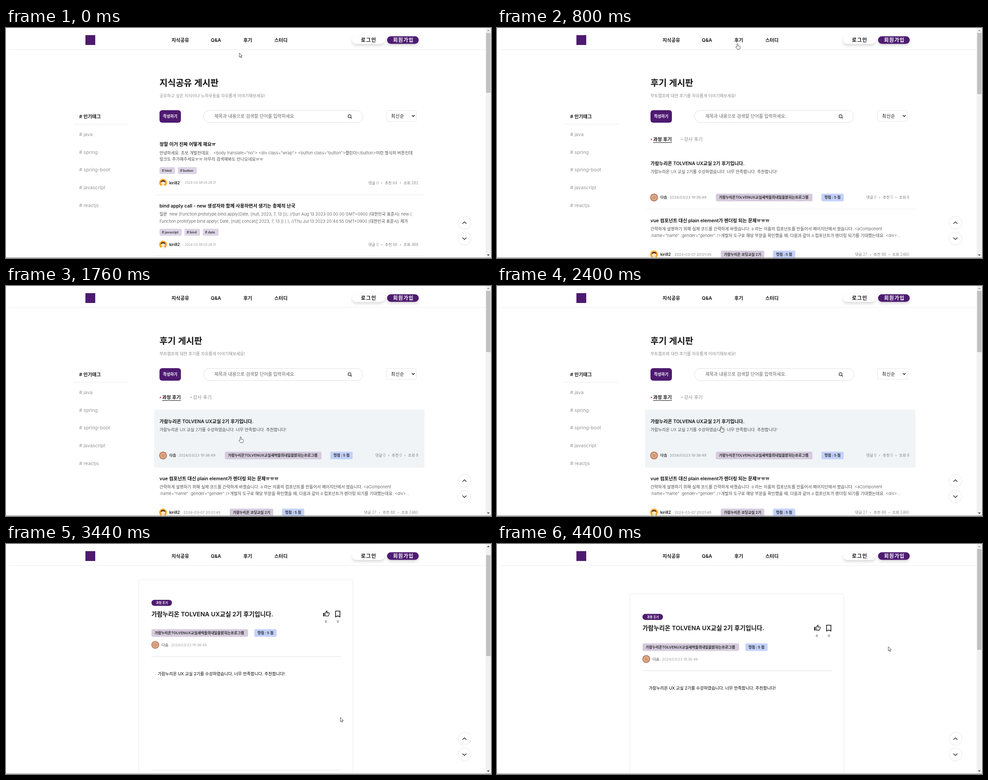
Write an HTML page that moves like this. It is 1087 px wide and 515 px high and loops after 4.48 s.

```html
<!DOCTYPE html>
<html lang="ko">
<head>
<meta charset="utf-8">
<title>Board</title>
<style>
html, body { margin: 0; width: 100%; height: 100%; overflow: hidden; background: #fff; }
svg { display: block; width: 1087px; height: 515px; }
text { font-family: Inter, "Noto Sans CJK KR", "Noto Sans CJK", sans-serif; white-space: pre; }
</style>
</head>
<body>
<svg id="stage" viewBox="0 0 1087 515" xmlns="http://www.w3.org/2000/svg"></svg>
<script>
const PURPLE = '#4e1a70', INK = '#141414', GRAY = '#8c8c8c';
const LOOP = 4480, STEP = 80;
const TO_REVIEW = 720, TO_DETAIL = 2640;

const esc = s => s.replace(/&/g, '&amp;').replace(/</g, '&lt;');
const text = (x, y, size, s, weight = 400, fill = INK, extra = '') =>
  `<text x="${x}" y="${y}" font-size="${size}" font-weight="${weight}" fill="${fill}" ${extra}>${esc(s)}</text>`;
const box = (x, y, w, h, r, fill, extra = '') =>
  `<rect x="${x}" y="${y}" width="${w}" height="${h}" rx="${r}" fill="${fill}" ${extra}/>`;
const frame = (x, y, w, h, r, color) => box(x, y, w, h, r, '#fff', `stroke="${color}"`);
const circle = (x, y, r, fill, extra = '') => `<circle cx="${x}" cy="${y}" r="${r}" fill="${fill}" ${extra}/>`;
const path = (d, extra) => `<path d="${d}" ${extra}/>`;
const stroke = (d, width, color = INK) => path(d, `fill="none" stroke="${color}" stroke-width="${width}"`);
const rule = (x1, x2, y, color = '#ececec') => stroke(`M${x1} ${y}H${x2}`, 1, color);

const title = '가람누리온 TOLVENA UX교실 2기 후기입니다.';
const course = '가람누리온TOLVENUX교실새싹들의내일을밝히는프로그램';
const praise = '가람누리온 UX 교실 2기를 수강하였습니다. 너무 만족합니다. 추천합니다!';
const user = 'kiri82', writer = '다솜';

const heading = (y, s) => text(344, y, 10.5, s, 600);
const body = (y, s) => text(344, y, 9.3, s, 300, '#4a4a4a');
const label = (x, y, w, s, fill) =>
  box(x, y, w, 17, 3, fill) + text(x + 7, y + 11.4, 8.1, s, 600, '#2a2a2a');
const courseTag = (x, y, w, s) => label(x, y, w, s, '#d5cbdd');
const scoreTag = (x, y) => label(x, y, 50, '평점 : 5 점', '#c3d1fb');

function hashTags(y, list) {
  return list.map(([x, w, s]) =>
    box(x, y, w, 15.5, 3, '#dcd3e5') + text(x + 5.2, y + 10.5, 7.3, '# ' + s, 600, '#333')).join('');
}

function boyIcon(x, y) {
  return circle(x, y, 8.7, '#f6a72b') +
    path(`M${x - 5} ${y + 7}q5 -5 10 0q-5 3.4 -10 0z`, 'fill="#fff"') +
    `<ellipse cx="${x}" cy="${y}" rx="4.8" ry="4.6" fill="#fde6cf"/>` +
    path(`M${x - 5.2} ${y}q-.4 -5.6 5.2 -5.6t5.2 5.6q-1.4 -2.6 -5 -2.8q-3.8 .2 -5.4 2.8z`, 'fill="#3b2a1c"');
}

function redIcon(x, y) {
  return circle(x, y, 8.7, '#b8735c') + circle(x, y, 6.8, '#dcae88') + circle(x, y + .5, 3.4, '#cf9674');
}

// Counters are laid out from the right edge.
function stats(y, counts) {
  let x = 924, out = '';
  ['조회', '추천', '댓글'].forEach((name, i) => {
    const n = String(counts[2 - i]);
    out += text(x, y + 3, 8.3, `${name} ${n}`, 300, '#777', 'text-anchor="end"');
    x -= 17.6 + 5.15 * n.length;
    if (i < 2) out += circle(x - 7, y + .4, 1, '#888');
    x -= 14;
  });
  return out;
}

function boardTop(name, hint) {
  const tags = ['java', 'spring', 'spring-boot', 'javascript', 'reactjs'];
  return text(344, 129.5, 19.8, name, 600) +
    text(344, 154.5, 9.25, hint, 400, GRAY) +
    text(164, 202.4, 10.6, '# 인기태그', 600) + rule(152, 272, 215.5) +
    tags.map((s, i) => text(164, 242 + 39.7 * i, 10.7, '# ' + s, 400, '#959595')).join('') +
    box(344, 184, 48, 28, 6, PURPLE) + text(352, 201.3, 8.7, '작성하기', 600, '#fff') +
    frame(442.5, 184.5, 357, 27, 13.5, '#e0e0e0') +
    text(467, 201.2, 10.1, '제목과 내용으로 검색할 단어를 입력하세요.', 300, '#666') +
    circle(770, 197.5, 3.3, 'none', 'stroke="#222" stroke-width="1.2"') + stroke('M772.4 199.9l2.6 2.6', 1.3) +
    frame(852.5, 184.5, 67, 24.5, 3, '#e6e6e6') +
    text(863, 200.5, 10, '최신순', 400, INK, 'letter-spacing=".7"') +
    stroke('M909.7 195.2l3 3 3-3', 1.6);
}

function knowledge() {
  const meta = y => boyIcon(352, y) + text(366, y + 3, 8.5, user, 600) + text(394, y + 3, 8, '·', 400, '#888') +
    text(401, y + 2.7, 6.9, '2024-03-08 05:28:31', 300, '#777');
  return boardTop('지식공유 게시판', '공유하고 싶은 지식이나 노하우등을 자유롭게 이야기해보세요!') +
    heading(264, '정말 이거 진짜 어떻게 해요ㅠ') +
    body(282.5, '안녕하세요. 초보 개발잔데요... <body translate="no"> <div class="wrap"> <button class="button">캘린더</button>이런 형식의 버튼인데') +
    body(297, '링크도 추가해주세요ㅠㅠ 아무리 검색해봐도 안나오네요ㅠㅠ') +
    hashTags(311.5, [[344, 35, 'html'], [385, 42.5, 'button']]) +
    meta(346.5) + stats(346.5, [0, 64, 282]) + rule(332, 938, 373.5) +
    heading(402, 'bind apply call - new 생성자와 함께 사용하면서 생기는 총체적 난국') +
    body(420.4, '질문  new (Function.prototype.bind.apply(Date, [null, 2023, 7, 13 ])); //Sun Aug 13 2023 00:00:00 GMT+0900 (대한민국 표준시) new (') +
    body(435.5, 'Function.prototype.bind.apply( Date, [null].concat([ 2023, 7, 13 ]) ) ); //Thu Jul 13 2023 20:44:55 GMT+0900 (대한민국 표준시) 제가') +
    hashTags(449.5, [[344, 50, 'javscript'], [400, 35, 'bind'], [441, 35.5, 'date']]) +
    meta(485) + stats(485, [0, 66, 488]) + rule(332, 938, 510.5);
}

function review() {
  return boardTop('후기 게시판', '부트캠프에 대한 후기를 자유롭게 이야기해보세요!') +
    circle(346, 249.5, 1.6, '#d0304a') + text(350, 252.5, 10.6, '과정 후기', 600) +
    rule(350, 392, 256.5, INK) +
    circle(414.7, 249.5, 1.4, '#aaa') + text(419, 252.5, 10.6, '강사 후기', 400, GRAY) +
    box(332, 277, 606, 128.5, 0, '#f0f4f7', 'id="hover"') +
    heading(306.5, title) + body(325, praise) +
    redIcon(352, 379.5) + text(366, 382.2, 8.3, writer, 600, '#333') +
    text(383, 382.2, 8.2, '·', 400, GRAY) + text(387, 382.2, 8.2, '2024/03/23 19:36:49', 400, GRAY) +
    courseTag(490.5, 371, 216.5, course) + scoreTag(727, 371) +
    stats(379, [0, 0, 8]) + rule(333, 938, 405.5) +
    heading(434.5, 'vue 컴포넌트 대신 plain element가 렌더링 되는 문제ㅠㅠㅠ') +
    body(452.5, '간략하게 설명하기 위해 실제 코드를 간략하게 바꿨습니다. a 라는 이름의 컴포넌트를 만들어서 페이지단에서 썼습니다. <aComponent') +
    body(467.7, ':name="name" :gender="gender" />개발자 도구로 해당 부분을 확인했을 때, 다음과 같이 a 컴포넌트가 렌더링 되기를 기대했는데요. <div>...') +
    boyIcon(352, 507) + text(366, 510, 8.5, user, 600) +
    text(394, 510, 8.1, '·', 400, GRAY) + text(398, 510, 8.1, '2024-03-07 20:01:45', 400, GRAY) +
    courseTag(501.5, 498.5, 97.5, '가람누리온 코딩교실 2기') + scoreTag(618.5, 498.5) +
    stats(507, [27, 88, 2460]);
}

function detail() {
  const like = 'M9 21h9c.8 0 1.5-.5 1.8-1.2l3-7q.2-.4.2-.8v-2a2 2 0 0 0-2-2h-6.3l1-4.6v-.3q0-.6-.5-1.1L14.2 1 7.6 7.6A2 2 0 0 0 7 9v10a2 2 0 0 0 2 2zM9 9l4.3-4.3L12 10h9v2l-3 7H9zM1 9h4v12H1z';
  return frame(297.5, 111.5, 480, 674, 5, '#ebebeb') +
    box(326, 156.5, 46, 13.5, 6.7, PURPLE) + text(336, 165.5, 6.8, '과정 후기', 600, '#fff') +
    text(326, 193.4, 13.6, title, 600) +
    path(like, `fill="${INK}" transform="translate(710.3 180) scale(.65)"`) +
    stroke('M738.6 181.8h9.8v13l-4.9-2.2-4.9 2.2z', 1.6) +
    text(714.7, 208, 6.8, '0') + text(741.7, 208, 6.8, '0') +
    courseTag(326, 222.4, 216.5, course) + scoreTag(556.5, 222.4) +
    redIcon(334.5, 257.5) + text(348.5, 260.7, 8.3, writer, 400, '#444') +
    text(365, 260.7, 8, '·', 400, '#888') + text(370, 260.7, 8.1, '2024/03/23 19:36:49', 300, '#888') +
    rule(326, 750, 283.5, '#dcdcdc') + text(340, 325.5, 9.3, praise, 400, '#000') +
    rule(326, 750, 538, '#e9e9e9') +
    path('M343 568h11.5v8.5h-4l-1.8 2.5-1.8-2.5h-3.9z', `fill="${INK}"`) +
    [346, 348.8, 351.6].map(x => circle(x, 572.3, .8, '#fff')).join('') +
    text(361, 578.3, 10.7, '댓글 0', 600) +
    circle(352, 621.5, 12, '#d2d2d2') + circle(352, 618, 4.5, '#fff') +
    path('M344.5 630.5q0-7 7.5-7t7.5 7q-7.5 5-15 0z', 'fill="#fff"') +
    frame(375.5, 603, 360, 63, 8, '#e8e8e8') +
    text(384, 621, 8.9, '댓글을 남겨주세요', 400, '#7a7a7a') +
    box(678, 633, 50, 17.5, 7, '#d3e7f6') + text(695.5, 644.6, 8, '저장', 600) +
    box(340, 702, 57, 28, 6, PURPLE) + text(352, 719, 8.7, '목록가기', 500, '#fff');
}

function shell() {
  const round = (y, d) => circle(1027.5, y, 14.5, '#fff', 'stroke="#e6e6e6"') +
    stroke(`M1023 ${y + d}l4.5 ${-2 * d}l4.5 ${2 * d}`, 1.3);
  const shadow = 'filter="url(#soft)"';
  return `<defs><filter id="soft" x="-20%" y="-60%" width="140%" height="280%">
      <feDropShadow dx="0" dy="3.5" stdDeviation="3" flood-opacity=".16"/></filter></defs>` +
    box(0, 0, 1075, 48, 0, '#fff') + rule(6, 1075, 48.5) +
    box(178, 16, 22, 22, 0, PURPLE) +
    [[371, '지식공유'], [459, 'Q&A'], [532, '후기'], [601.5, '스터디']]
      .map(([x, s]) => text(x, 31, 10.7, s, 600)).join('') +
    box(776, 18.5, 72, 17, 8.5, '#fff', shadow) + box(854, 18.5, 71, 17, 8.5, PURPLE, shadow) +
    text(795.5, 30.8, 11.3, '로그인', 600, INK, 'letter-spacing="1.2"') +
    text(867.5, 30.8, 11.3, '회원가입', 600, '#fff', 'letter-spacing="1.2"') +
    round(436, 2.2) + round(471.5, -2.2) +
    box(1075, 0, 12, 515, 0, '#f1f1f1') + box(1076, 11, 10, 134, 0, '#c1c1c1', 'id="thumb"') +
    path('M1078 7l3-3.5 3 3.5z', 'id="up"') + path('M1078 507l3 3.5 3-3.5z', 'fill="#505050"') +
    box(0, 514, 1087, 1, 0, '#858585');
}

function pointers() {
  const look = 'fill="#fff" stroke="#222" stroke-width=".8" stroke-linejoin="round"';
  return '<g id="pointer">' +
    path('M0 0v9.4l2.1-2 1.5 3.3 1.5-.7-1.4-3.2h2.9z', `id="arrow" ${look}`) +
    path('M-1.2 7.5V1.2a1.2 1.2 0 0 1 2.4 0V4.8l4 1q1.2.4 1 1.7l-.6 3.3-.9 2h-4.8l-3.6-4.3q-.6-1.3 1-1.2z', `id="hand" ${look}`) +
    '</g>';
}

const pages = { knowledge, review, detail };
const thumbSize = { knowledge: 134, review: 137, detail: 226 };
const stage = document.getElementById('stage');
stage.innerHTML = box(0, 0, 1087, 515, 0, '#fff') +
  Object.keys(pages).map(id => `<g id="${id}">${pages[id]()}</g>`).join('') + shell() + pointers();
const el = id => document.getElementById(id);
const show = (id, on) => el(id).setAttribute('display', on ? 'inline' : 'none');

// Rows are time followed by values.
const move = [[0, 523, 56], [480, 539, 35], [880, 539, 35], [1120, 532, 305], [1360, 526, 338], [2080, 526, 338],
  [2480, 500, 312], [2640, 500, 312], [2960, 362.5, 170.5], [3040, 362.5, 170.5], [3280, 749.5, 388.5],
  [4080, 749.5, 388.5], [4400, 877, 230]];
const wheel = [[3280, 0], [3360, 3], [3440, 31.6], [3600, 140], [3840, 283], [3960, 283], [4240, 0]];

function along(keys, t, ease) {
  const i = keys.findIndex(k => k[0] > t);
  if (i < 0) return keys[keys.length - 1].slice(1);
  const a = keys[i - 1], b = keys[i];
  if (!a) return b.slice(1);
  const p = ease((t - a[0]) / (b[0] - a[0]));
  return a.slice(1).map((v, n) => v + (b[n + 1] - v) * p);
}

function draw(t) {
  const page = t < TO_REVIEW ? 'knowledge' : t < TO_DETAIL ? 'review' : 'detail';
  Object.keys(pages).forEach(id => show(id, id === page));

  const [scroll] = along(wheel, t, p => p);
  el('detail').setAttribute('transform', `translate(0 ${-scroll})`);
  el('thumb').setAttribute('y', 11 + scroll * .44);
  el('thumb').setAttribute('height', thumbSize[page]);
  el('up').setAttribute('fill', scroll > 0 ? '#505050' : '#a3a3a3');

  const [x, y] = along(move, t, p => p * p * (3 - 2 * p));
  const onRow = page === 'review' && y > 277 && y < 405;
  const onNav = page !== 'detail' && x > 530 && y < 40;
  show('hover', onRow);
  show('hand', onRow || onNav);
  show('arrow', !onRow && !onNav);
  el('pointer').setAttribute('transform', `translate(${x} ${y})`);
}

function tick() {
  draw(Math.floor(performance.now() % LOOP / STEP) * STEP);
  requestAnimationFrame(tick);
}
tick();
</script>
</body>
</html>
```
